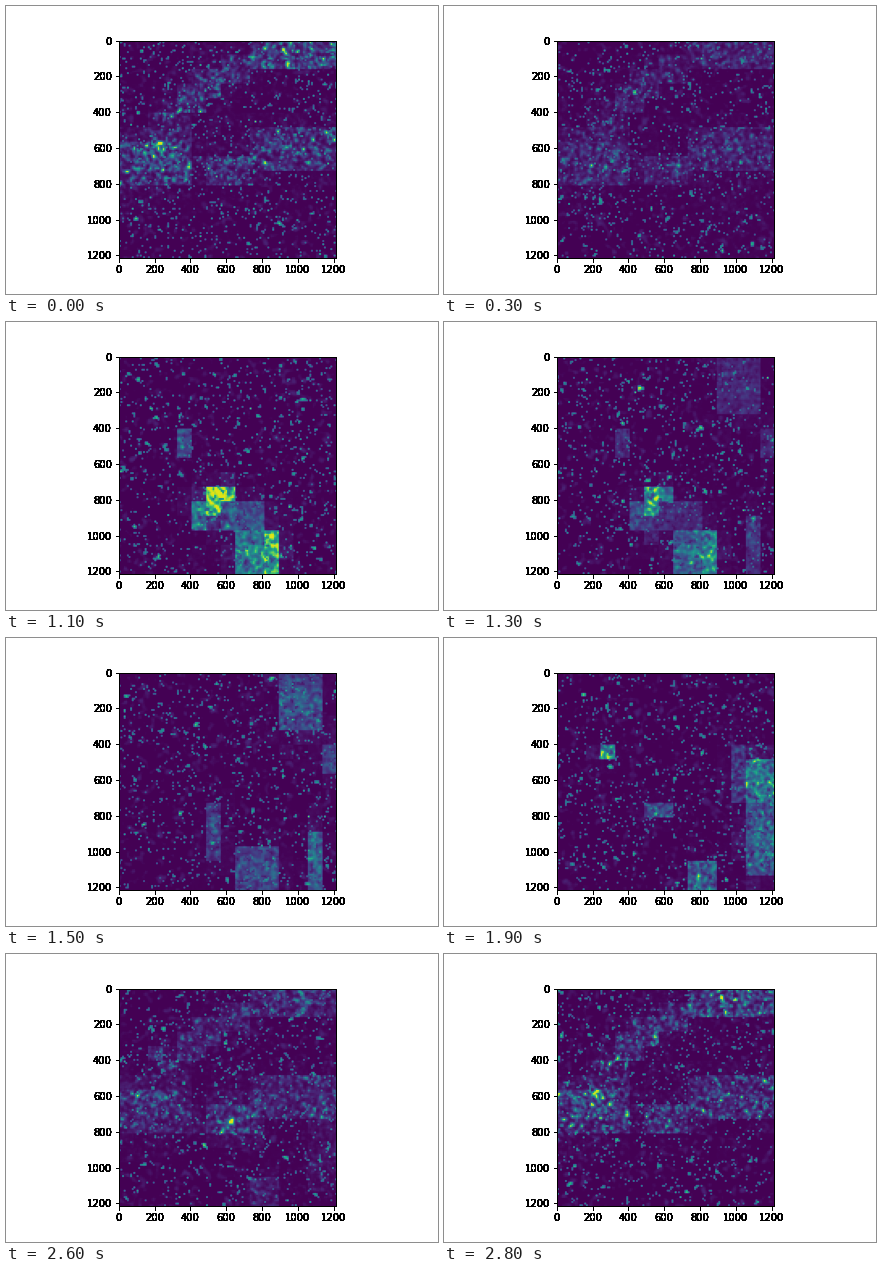
A matplotlib script for the animation above (2.9 s loop, 432x288 px).

```python
import numpy as np
import matplotlib.pyplot as plt
from matplotlib.animation import FuncAnimation

plt.rcParams["font.family"] = "DejaVu Sans"
plt.rcParams["font.size"] = 10

W, H, DPI = 432, 288, 72
FRAMES, STEP = 29, 100
TILES, CELLS, UNIT = 15, 9, 9     # tiles per side, cells per tile, data units per cell
N = TILES * CELLS
SIZE = N * UNIT
rng = np.random.default_rng(12)
row, col = np.mgrid[:TILES, :TILES] + 0.5


def blur(a):
    """Small separable blur, scaled back to unit spread."""
    for axis in (0, 1):
        a = 0.5 * a + 0.25 * (np.roll(a, 1, axis) + np.roll(a, -1, axis))
    return a / a.std()


class Noise:
    """Cell noise that drifts in time and closes after one loop."""

    def __init__(self, harmonics, soft):
        self.k = np.arange(1, harmonics + 1)
        self.parts = rng.normal(size=(2, harmonics, N, N)) / np.sqrt(harmonics)
        self.soft = soft

    def at(self, i):
        p = 2 * np.pi * self.k * i / FRAMES
        a = (np.tensordot(np.cos(p), self.parts[0], 1)
             + np.tensordot(np.sin(p), self.parts[1], 1))
        for _ in range(self.soft):
            a = blur(a)
        return a


def tiles(spots):
    """Brightness per tile: boxy spots, each with a faint ragged halo."""
    a = np.zeros((TILES, TILES))
    for x, y, rx, ry, level in spots:
        dx, dy = (col - x) / rx, (row - y) / ry
        core = np.exp(-dx**6 - dy**6) * rng.uniform(0.85, 1.1, a.shape)
        halo = 0.4 * np.exp(-(dx**2 + dy**2) / 3) * rng.random(a.shape) ** 2
        a = np.maximum(a, level * np.maximum(core, halo))
    return np.kron(a, np.ones((CELLS, CELLS)))


# Spots: centre x, y and half width, height in tiles, then level
bands = tiles([(3.5 + 1.4 * k, 5.5 - 1.2 * k, 1, 1, 0.15) for k in range(4)] + [
    (2.5, 8.2, 2.5, 1.8, 0.22), (12, 1, 3, 1, 0.21),
    (12, 7.5, 3, 1.5, 0.17), (7.5, 9, 1.5, 1, 0.17)])
quiet = tiles([(12, 12, 3, 3, 0.025)])
blocks = tiles([
    (6.5, 10, 0.5, 1, 0.85), (7.5, 9.5, 0.5, 0.5, 0.75), (8.5, 11, 1.5, 1, 0.27),
    (10.5, 13.5, 0.5, 1.5, 0.85), (9, 13.5, 1, 1.5, 0.48), (5.5, 11, 0.5, 1, 0.4),
    (4.5, 6, 0.5, 1, 0.26)])
column = tiles([
    (12.5, 2, 1.5, 2, 0.26), (13.5, 13, 0.5, 2, 0.33), (14.5, 6, 0.5, 1, 0.22),
    (6.5, 11, 0.5, 2, 0.2), (9.5, 13.5, 1.5, 1.5, 0.22)])
edge = tiles([
    (14, 7.5, 1, 1.5, 0.44), (14, 11.5, 1, 2.5, 0.34), (12.5, 7, 0.5, 2, 0.2),
    (3.5, 5.5, 0.5, 0.5, 0.45), (7, 9.5, 1, 0.5, 0.21), (10, 14, 1, 1, 0.33)])
fading = tiles([
    (2.5, 4.5, 0.5, 0.5, 0.32), (8.5, 1.5, 0.5, 0.5, 0.2), (7.5, 9.5, 0.5, 0.5, 0.32),
    (8, 9, 2, 2, 0.14), (14, 10, 1, 4, 0.14), (10, 14, 1, 1, 0.24)])

SCENES = [bands, quiet, blocks, column, edge, fading, bands]
TIMES = [0, 7, 11, 15, 19, 23, 28]
ROUGH = [0.75, 0.5, 0.3, 0.3, 0.4, 0.4, 0.75]     # texture strength
FINE = [1, 0.3, 0.5, 0.6, 0.5, 0.2, 0.7]          # share of single-cell specks

texture = Noise(4, 1)
haze = Noise(4, 2)
sharp = Noise(6, 0)
wide = Noise(5, 1)


def specks(noise, cut):
    return np.where(noise > cut, 0.32 + 0.25 * (noise - cut), 0)


def field(i):
    s = min(np.searchsorted(TIMES, i, side="right") - 1, len(TIMES) - 2)
    u = (i - TIMES[s]) / (TIMES[s + 1] - TIMES[s])
    u = u * u * (3 - 2 * u)

    def mix(keys):
        return (1 - u) * keys[s] + u * keys[s + 1]

    rough, fine, blobs = mix(ROUGH), mix(FINE), wide.at(i)
    a = mix(SCENES) * np.exp(rough * texture.at(i) - rough**2 / 2)
    a = np.where(blobs < -1.4, 0.5 * a, np.minimum(a, 0.95))
    a = np.maximum(a, np.clip(0.04 * (haze.at(i) - 0.6), 0, 0.1))
    a = np.maximum(a, specks(sharp.at(i), 2.1 - 0.4 * fine))
    return np.maximum(a, specks(blobs, 1.65 + 0.45 * fine))


fig = plt.figure(figsize=(W / DPI, H / DPI), dpi=DPI, facecolor="white")
side = 0.755 * H
box = [0.5125 - side / W / 2, 0.125, side / W, 0.755]


def add_axes():
    ax = fig.add_axes(box)
    ax.patch.set_visible(False)
    ax.set_xlim(-0.5, SIZE - 0.5)
    ax.set_ylim(SIZE - 0.5, -0.5)
    ax.set_xticks(range(0, SIZE, 200))
    ax.set_yticks(range(0, SIZE, 200))
    return ax


# Stacked axes darken the soft glyph edges until neighbouring digits touch
layers = [add_axes() for _ in range(24)]
image = layers[0].imshow(field(0), cmap="viridis", vmin=0, vmax=1, aspect="auto",
                         extent=(-0.5, SIZE - 0.5, SIZE - 0.5, -0.5))


def update(i):
    image.set_data(field(i))
    return [image]


anim = FuncAnimation(fig, update, frames=FRAMES, interval=STEP, repeat=True,
                     repeat_delay=0, blit=False)
plt.show()
```
